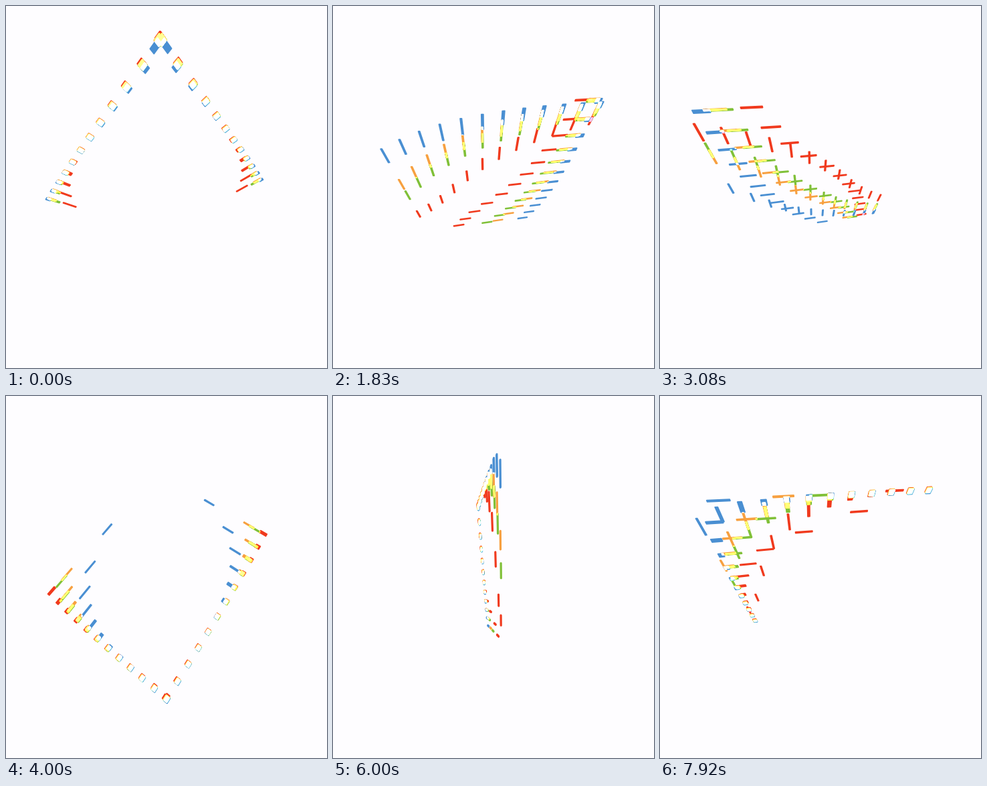
These frames come from a looping animation (480x540 px, 8 s). An HTML page with a canvas:

```html
<!DOCTYPE html>
<html lang="en">
<head>
<meta charset="utf-8">
<title>Perspective beads</title>
<style>
  html, body { margin: 0; width: 100%; height: 100%; overflow: hidden; background: #fefdff; }
  canvas { display: block; width: 480px; height: 540px; }
</style>
</head>
<body>
<canvas id="stage" width="480" height="540"></canvas>
<script>
const stage = document.getElementById('stage').getContext('2d');
const layer = document.createElement('canvas');
layer.width = 480;
layer.height = 540;
const pen = layer.getContext('2d');
pen.lineJoin = 'round';

const LOOP = 8000, TICKS_PER_MS = 0.012, TICKS = 96;
const COUNT = 12, CELL = 1 / (COUNT - 1), HALF = 0.0105, STRETCH = 0.03;

const INKS = [
  { color: '#f03a1e', lag: 0, shift: -1.5 },
  { color: '#80c038', lag: 0.08, shift: 0.5 },
  { color: '#f7a040', lag: 0.105, shift: -0.5 },
  { color: '#4a8fd2', lag: 0.19, shift: 1.5 }
];

// Corners run near-left, near-right, far-right, far-left.
const DIAMOND = [[60, 286], [231, 48], [383, 257], [230, 342]];
const FLOOR = [[40, 157], [402, 140], [317, 310], [142, 335]];
const TILTED = [[62, 300], [225, 112], [392, 210], [240, 452]];
const UPRIGHT = [[249, 55], [217, 165], [230, 340], [252, 364]];

// "paired" scenes move rows and columns in the same sense, nearest row first.
const scenes = [
  { start: 0, quad: DIAMOND, phase: 0.41, rate: 0.1 },
  { start: 11, quad: TILTED, phase: 0.4, rate: 0.1 },
  { start: 21, quad: FLOOR, phase: 0.479, rate: 0.0713, spread: 0.35 },
  { start: 41, quad: TILTED, phase: 0.56, rate: 0.09 },
  { start: 51, quad: DIAMOND, phase: 0.76, rate: 0.07, paired: true },
  { start: 71, quad: UPRIGHT, phase: 0.5, rate: 0.08, pad: 3 },
  { start: 81, quad: FLOOR, phase: 0.788, rate: 0.128, paired: true }
];

const clamp = x => Math.max(0, Math.min(1, x));
const ease = x => x < 0.5 ? 2 ** (20 * x - 11) : 1 - 2 ** (9 - 20 * x);

function projector([[x0, y0], [x1, y1], [x2, y2], [x3, y3]]) {
  const ax = x1 - x2, ay = y1 - y2, bx = x3 - x2, by = y3 - y2;
  const sx = x0 - x1 + x2 - x3, sy = y0 - y1 + y2 - y3;
  const det = ax * by - bx * ay;
  const g = (sx * by - bx * sy) / det, h = (ax * sy - sx * ay) / det;
  return (a, b) => {
    const w = g * a + h * b + 1;
    return [
      ((x1 - x0 + g * x1) * a + (x3 - x0 + h * x3) * b + x0) / w,
      ((y1 - y0 + g * y1) * a + (y3 - y0 + h * y3) * b + y0) / w
    ];
  };
}
scenes.forEach(scene => { scene.project = projector(scene.quad); });

// Beads run to and fro; near mid-run they grow long and thin.
function travel(phase) {
  const leg = Math.floor(phase), x = phase - leg;
  const stretch = clamp((0.25 - Math.abs(x - 0.5)) / 0.13);
  return {
    at: leg & 1 ? 1 - ease(x) : ease(x),
    long: HALF + STRETCH * stretch,
    thin: HALF * (1 - 0.75 * stretch)
  };
}

function bead(project, a, b, halfA, halfB, shift) {
  pen.beginPath();
  for (const [i, j] of [[-1, -1], [1, -1], [1, 1], [-1, 1]]) {
    const [x, y] = project(a + i * halfA, b + j * halfB);
    pen.lineTo(x + shift * 0.4, y + shift * 0.8);
  }
  pen.closePath();
  pen.fill();
  pen.stroke();
}

function drawInk({ color, lag, shift }, scene, phase) {
  const { project, paired, pad = 2, spread = 1 } = scene;
  pen.clearRect(0, 0, 480, 540);
  pen.fillStyle = pen.strokeStyle = color;
  pen.lineWidth = pad;
  for (let i = 0; i < COUNT; i++) {
    const lane = i * CELL;
    const stagger = 0.5 * spread;
    const inkPhase = phase - lag * Math.sqrt(spread);
    const col = travel(inkPhase - stagger * lane);
    const row = travel(inkPhase - stagger * (paired ? lane : 1 - lane));
    bead(project, lane, col.at, col.thin, col.long, shift);
    bead(project, paired ? row.at : 1 - row.at, lane, row.long, row.thin, shift);
  }
}

function draw(tick) {
  const scene = scenes.filter(s => s.start <= tick).pop();
  const phase = scene.phase + (tick - scene.start) * scene.rate;
  stage.clearRect(0, 0, 480, 540);
  // Overlapping inks add up to yellow and white.
  stage.globalCompositeOperation = 'lighter';
  for (const ink of INKS) {
    drawInk(ink, scene, phase);
    stage.drawImage(layer, 0, 0);
  }
}

let shown = -1;
function play() {
  const tick = Math.floor((performance.now() % LOOP + 5) * TICKS_PER_MS) % TICKS;
  if (tick !== shown) draw(shown = tick);
  requestAnimationFrame(play);
}
play();
</script>
</body>
</html>
```
